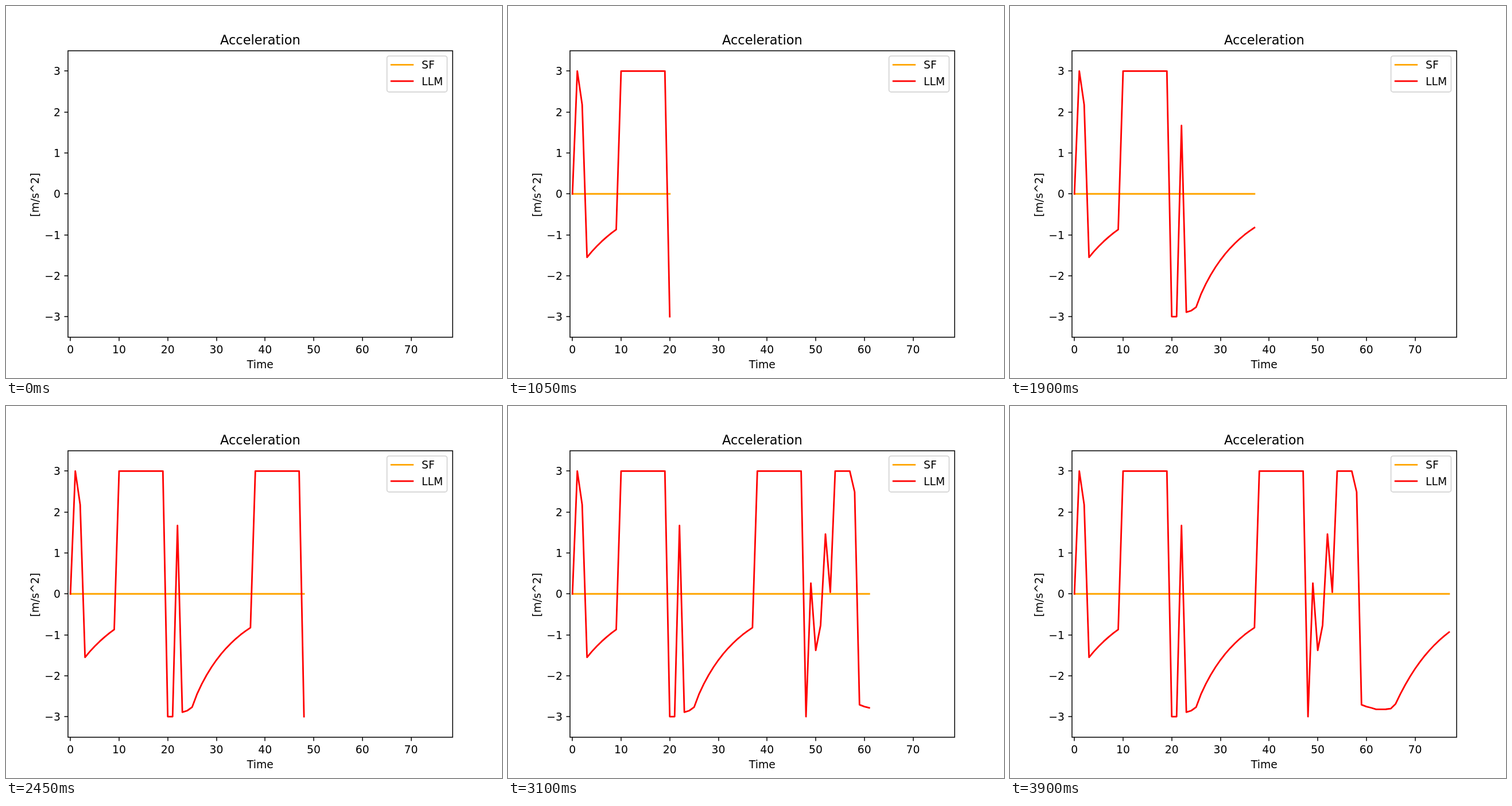
These frames come from a looping animation (864x648 px, 3950 ms). An HTML page with a canvas:

```html
<!DOCTYPE html>
<html lang="en">
<head>
<meta charset="utf-8">
<title>Acceleration</title>
<style>
  html, body { margin: 0; width: 100%; height: 100%; overflow: hidden; background: #fff; }
  canvas { display: block; }
</style>
</head>
<body>
<canvas id="chart" width="864" height="648"></canvas>
<script>
const ctx = document.getElementById('chart').getContext('2d');
const LOOP = 3950, STEP = 50;
const LEFT = 108, RIGHT = 778, TOP = 78, BOTTOM = 577;
const px = t => 112.24 + t * 8.4759;
const py = a => 327.24 - a * 71.28;

const hold = (value, count) => Array(count).fill(value);
// Exponential approach from a to b over n steps, both ends included
const decay = (a, b, n, power = 1) =>
  Array.from({ length: n + 1 }, (_, k) => a * (b / a) ** ((k / n) ** power));

const llm = [
  0, 3, 2.18, ...decay(-1.55, -0.873, 6),
  ...hold(3, 10), -3, -3, 1.67, -2.893, -2.855, ...decay(-2.77, -0.825, 12, 0.927),
  ...hold(3, 10), -3, 0.26, -1.38, -0.77, 1.46, 0.04,
  ...hold(3, 4), 2.49, -2.71, -2.755, -2.785, -2.822, -2.822, -2.82, -2.805,
  ...decay(-2.69, -0.935, 11)
];
const sf = hold(0, llm.length);

function line(points, color, width, cap = 'butt') {
  ctx.beginPath();
  points.forEach(([x, y]) => ctx.lineTo(x, y));
  ctx.strokeStyle = color;
  ctx.lineWidth = width;
  ctx.lineCap = cap;
  ctx.lineJoin = 'round';
  ctx.stroke();
}

function text(str, x, y, align = 'center', size = 18.75) {
  ctx.font = `${size}px "DejaVu Sans", sans-serif`;
  ctx.textAlign = align;
  ctx.fillStyle = '#000';
  ctx.fillText(str, x, y);
}

function drawAxes() {
  ctx.strokeStyle = '#000';
  ctx.lineWidth = 1.5;
  ctx.lineJoin = 'miter';
  ctx.strokeRect(LEFT, TOP, RIGHT - LEFT, BOTTOM - TOP);
  for (let t = 0; t <= 70; t += 10) {
    const x = Math.round(px(t));
    line([[x, BOTTOM], [x, BOTTOM + 6.5]], '#000', 1.5);
    text(t, px(t), 605);
  }
  for (let a = -3; a <= 3; a++) {
    const y = Math.round(py(a));
    line([[LEFT - 6.5, y], [LEFT, y]], '#000', 1.5);
    text(String(a).replace('-', '\u2212'), 94.9, y + 7, 'right');
  }
  text('Acceleration', 442.8, 67, 'center', 22.5);
  text('Time', 442.8, 631);
  ctx.save();
  ctx.translate(57, 329);
  ctx.rotate(-Math.PI / 2);
  text('[m/s^2]', 0, 0);
  ctx.restore();
}

function drawLegend() {
  ctx.beginPath();
  ctx.roundRect(663.6, 87.1, 104.8, 62.6, 3.75);
  ctx.fillStyle = '#fff';
  ctx.fill();
  ctx.strokeStyle = '#d6d6d6';
  ctx.lineWidth = 1.875;
  ctx.stroke();
  [['SF', 'orange', 102.4], ['LLM', 'red', 130.9]].forEach(([name, color, y]) => {
    line([[671.2, y], [708.7, y]], color, 2.8125, 'square');
    text(name, 724, Math.round(y + 7), 'left');
  });
}

function drawSeries(values, color, last) {
  const points = values.slice(0, last + 1).map((a, t) => [px(t), py(a)]);
  line(points, color, 2.8125, 'square');
}

function frame(now) {
  const last = Math.max(0, Math.floor((now % LOOP) / STEP) - 1);
  ctx.fillStyle = '#fff';
  ctx.fillRect(0, 0, 864, 648);
  if (last > 0) {
    drawSeries(sf, 'orange', last);
    drawSeries(llm, 'red', last);
  }
  drawAxes();
  drawLegend();
}

const start = performance.now();
function tick() {
  frame(performance.now() - start);
  requestAnimationFrame(tick);
}
tick();
</script>
</body>
</html>
```
